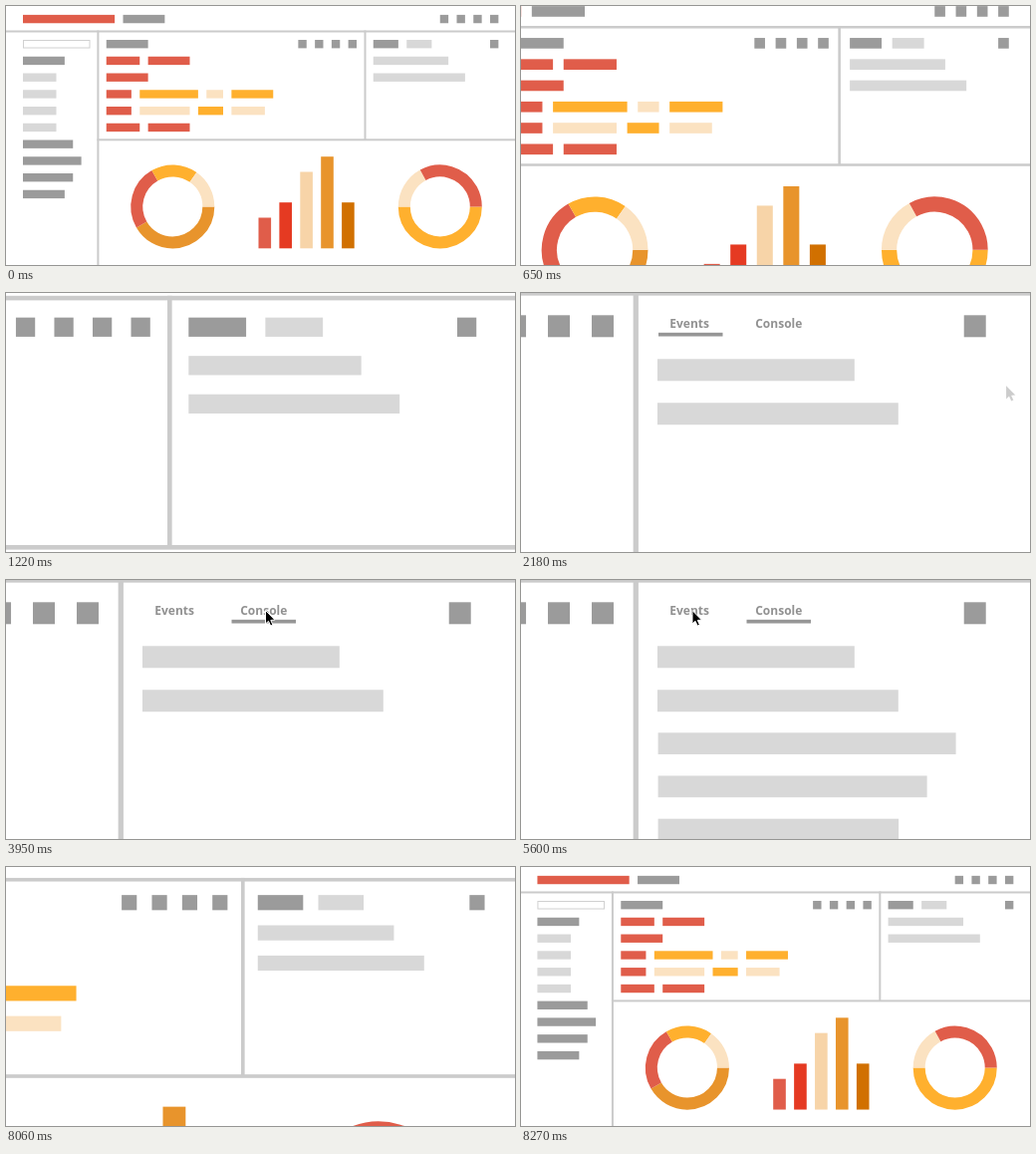
An HTML page with a canvas that plays this animation: 511 by 260 pixels, repeating every 8300 ms.

```html
<!DOCTYPE html>
<html lang="en">
<head>
<meta charset="utf-8">
<title>Dashboard zoom</title>
<style>
  html, body { margin: 0; height: 100%; overflow: hidden; background: #fff; }
  canvas { display: block; }
</style>
</head>
<body>
<canvas id="stage" width="511" height="260"></canvas>
<script>
const ctx = document.getElementById('stage').getContext('2d');
const LOOP = 8300, STEP = 30, ZOOM = 1.625;
const UNIT = 8.375;
const FOCUS = { x: 511.4, y: 41.2 };
const RED = '#e05d4a', GRAY = '#9b9b9b', LIGHT = '#d8d8d8', LINE = '#cbcbcb';
const AMBER = '#ffb02e', CREAM = '#fbe2c1', ORANGE = '#e8942c';

// Blocks on the unit grid: row, column, width, colour
const blocks = [
  [1, 2, 11, RED], [1, 14, 5, GRAY],
  [4, 12, 5, GRAY], [6, 12, 4, RED], [6, 17, 5, RED], [8, 12, 5, RED],
  [10, 12, 3, RED], [10, 16, 7, AMBER], [10, 24, 2, CREAM], [10, 27, 5, AMBER],
  [12, 12, 3, RED], [12, 16, 6, CREAM], [12, 23, 3, AMBER], [12, 27, 4, CREAM],
  [14, 12, 4, RED], [14, 17, 5, RED],
  [6, 44, 9, LIGHT], [8, 44, 11, LIGHT], [4, 58, 1, GRAY]
];
[5, 4, 4, 4, 4, 6, 7, 6, 5].forEach((w, i) =>
  blocks.push([6 + 2 * i, 2, w, i > 0 && i < 5 ? LIGHT : GRAY]));
for (let i = 0; i < 4; i++)
  blocks.push([1, 52 + 2 * i, 1, GRAY], [4, 35 + 2 * i, 1, GRAY]);
const tabs = [[4, 44, 3, GRAY], [4, 48, 3, LIGHT]];

function rect(x, y, w, h, color) {
  ctx.fillStyle = color;
  ctx.fillRect(x, y, w, h);
}

function block([row, col, w, color]) {
  rect(col * UNIT + 0.25, row * UNIT + 0.5, w * UNIT, UNIT, color);
}

// Each slice is [end angle in degrees, colour], starting at 0
function donut(x, y, slices) {
  let from = 0;
  ctx.lineWidth = 12;
  for (const [to, color] of slices) {
    ctx.beginPath();
    ctx.arc(x, y, 36, from * Math.PI / 180, to * Math.PI / 180);
    ctx.strokeStyle = color;
    ctx.stroke();
    from = to;
  }
}

function dashboard(tabAlpha) {
  rect(0, 24.5, 511.5, 2, LINE);
  rect(91.4, 24.5, 2, 236, LINE);
  rect(359.5, 24.5, 2, 110, LINE);
  rect(91.4, 133.3, 420, 2, LINE);

  blocks.forEach(block);
  ctx.globalAlpha = tabAlpha;
  tabs.forEach(block);
  ctx.globalAlpha = 1;

  ctx.strokeStyle = '#d0d0d0';
  ctx.lineWidth = 1;
  ctx.strokeRect(17.5, 34.5, 66.5, 7.5);

  donut(167.3, 201.4, [[150, ORANGE], [240, RED], [305, AMBER], [360, CREAM]]);
  donut(435.8, 201.4, [[180, AMBER], [241.5, CREAM], [360, RED]]);
  [[212.5, RED], [197.2, '#e53a22'], [166.5, '#f7d4a8'], [151.2, ORANGE], [197.2, '#d17000']]
    .forEach(([top, color], i) => rect(253.5 + 20.9 * i, top, 12.6, 243.3 - top, color));
}

function labels(slide) {
  ctx.font = '700 12px "Open Sans", "Noto Sans", sans-serif';
  ctx.fillStyle = '#919191';
  ctx.fillText('Events', 149.3, 35.3);
  ctx.fillText('Console', 235.2, 35.3);
  rect(138 + 88.5 * slide, 39.8, 64.5, 3.7, '#969696');
}

function cursor(x, y) {
  ctx.save();
  ctx.translate(x, y);
  ctx.beginPath();
  [[0, 0], [0, 13.5], [3, 10.8], [5.2, 15.6], [7.4, 14.6], [5.3, 9.9], [9.4, 9.6]]
    .forEach(([px, py]) => ctx.lineTo(px, py));
  ctx.closePath();
  ctx.fillStyle = '#000';
  ctx.fill();
  ctx.strokeStyle = '#fff';
  ctx.lineWidth = 1;
  ctx.stroke();
  ctx.restore();
}

function ripple(x, y, p) {
  if (p <= 0 || p >= 1) return;
  ctx.globalAlpha = 1 - p;
  ctx.beginPath();
  ctx.arc(x, y, 9.5 * p, 0, 2 * Math.PI);
  ctx.strokeStyle = GRAY;
  ctx.lineWidth = 1;
  ctx.stroke();
}

function draw(time) {
  const t = Math.floor((time % LOOP - 20) / STEP) * STEP + 20;
  // Linear progress in n steps; the first step shows at `start`
  const ramp = (start, n, step = STEP) =>
    Math.min(1, Math.max(0, (Math.floor((t - start) / step) + 1) / n));

  const scale = 1 + ZOOM * (ramp(530, 30) - 0.9993 * ramp(7880, 14));
  const text = ramp(1880, 5) - ramp(7460, 5, 60);
  const slide = ramp(3680, 10) - ramp(5780, 10);
  const logs = ramp(4220, 5) - ramp(6320, 5);
  const pointer = ramp(2180, 5) - ramp(7130, 5);
  const toConsole = ramp(2480, 15), toEvents = ramp(4730, 15), leave = ramp(6680, 20);

  ctx.globalAlpha = 1;
  rect(0, 0, 511, 260, '#fff');
  ctx.save();
  ctx.translate(FOCUS.x * (1 - scale), FOCUS.y * (1 - scale));
  ctx.scale(scale, scale);
  dashboard(1 - text);
  ctx.restore();

  ctx.globalAlpha = text;
  labels(slide);

  ctx.globalAlpha = logs;
  [299, 270, 241.5].forEach((w, i) => rect(137.6, 153.3 + 43.2 * i, w, 21.7, LIGHT));

  ripple(259.5, 31.5, ramp(3230, 10));
  ripple(172, 31.5, ramp(5330, 10));

  ctx.globalAlpha = pointer;
  cursor(487 - 226.5 * toConsole - 88.5 * toEvents + 298 * leave,
         93 - 62.5 * toConsole + 46 * leave);
}

const begin = performance.now();
function tick() {
  draw(performance.now() - begin);
  requestAnimationFrame(tick);
}
tick();
</script>
</body>
</html>
```
